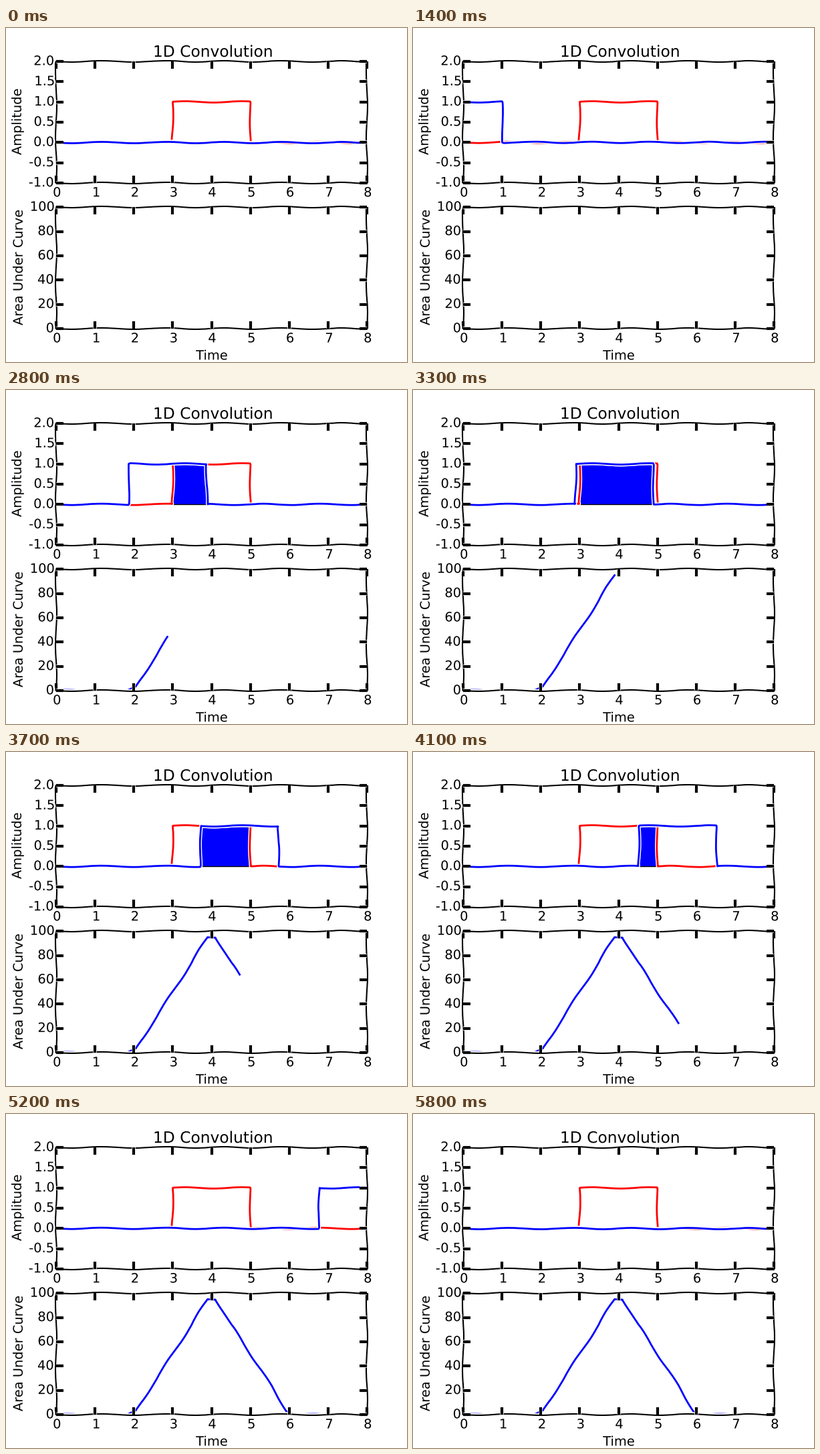
Recreate the animation shown at these times as a matplotlib script. Size 600 by 500 pixels, loop 5.9 s.

```python
import numpy as np
import matplotlib.pyplot as plt
from matplotlib.animation import FuncAnimation
from matplotlib.textpath import TextPath
from matplotlib.transforms import Affine2D

FRAMES, INTERVAL, DPI = 59, 100, 100
HOLD = 9  # frames of stillness before the sliding pulse enters

plt.style.use("classic")
plt.xkcd()
plt.rcParams["font.family"] = "DejaVu Sans"

t = np.linspace(0, 8, 400)
centers = np.linspace(-1, 9, FRAMES - HOLD)


def pulse(center):
    """Unit-height box, two units wide."""
    return (np.abs(t - center) < 1).astype(float)


fixed = pulse(4)
areas = np.array([np.sum(fixed * pulse(c)) for c in centers])

fig, (top, bottom) = plt.subplots(2, 1, figsize=(6, 5), dpi=DPI,
                                  facecolor="white")


def align_by_ink(text, fraction):
    """Align by the inked width, leaving out the glyphs' side bearings."""
    upright = text.get_rotation() == 90
    box = text.get_window_extent()
    ink = TextPath((0, 0), text.get_text(), size=text.get_size() * DPI / 72,
                   prop=text.get_fontproperties()).get_extents().width
    shift = fraction * ((box.height if upright else box.width) - ink)
    offset = (0, shift) if upright else (shift, 0)
    text.set_transform(text.get_transform() + Affine2D().translate(*offset))


def setup(ax, yticks, title="", xlabel="", ylabel=""):
    ax.set_xlim(0, 8)
    ax.set_xticks(range(9))
    ax.set_ylim(yticks[0], yticks[-1])
    ax.set_yticks(yticks)
    ax.set(title=title, xlabel=xlabel, ylabel=ylabel)
    for tick in ax.get_xticklines() + ax.get_yticklines():
        tick.set_sketch_params(None)  # straight ticks on wavy spines
    for label in ax.get_yticklabels():
        align_by_ink(label, 1)
    names = [ax.title, ax.xaxis.label, ax.yaxis.label]
    for label in ax.get_xticklabels() + [n for n in names if n.get_text()]:
        align_by_ink(label, 0.5)


setup(top, np.arange(-1, 2.5, 0.5), title="1D Convolution",
      ylabel="Amplitude")
setup(bottom, np.arange(0, 101, 20), xlabel="Time",
      ylabel="Area Under Curve")

top.plot(t, fixed, color="red")
moving, = top.plot(t, pulse(centers[0]), color="blue")
result, = bottom.plot([], [], color="blue")


def update(frame):
    step = max(frame - HOLD, 0)
    sliding = pulse(centers[step])
    moving.set_ydata(sliding)
    for overlap in list(top.collections):
        overlap.remove()
    product = fixed * sliding
    if product.any():
        top.fill_between(t, product, where=product > 0, facecolor="blue",
                         edgecolor="black", linewidth=1)
    result.set_data(centers[:step + 1], areas[:step + 1])
    return moving, result


anim = FuncAnimation(fig, update, frames=FRAMES, interval=INTERVAL,
                     repeat=True, repeat_delay=0)
plt.show()
```
